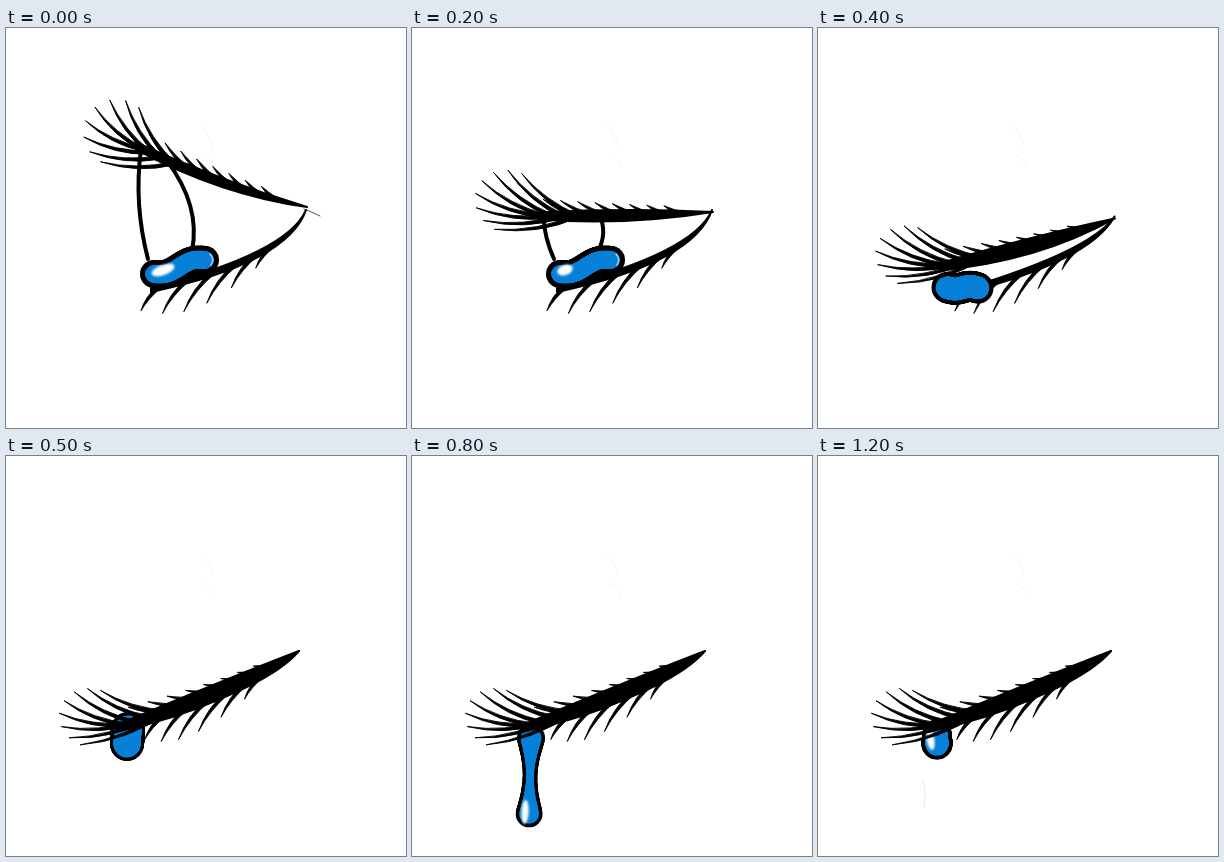
Write an HTML page with a canvas that moves like this. It is 400 px wide and 400 px high and loops after 1.4 s.

```html
<!DOCTYPE html>
<html lang="en">
<head>
<meta charset="utf-8">
<title>Tear</title>
<style>
html, body { margin: 0; width: 100%; height: 100%; overflow: hidden; background: #fff; }
canvas { display: block; width: 400px; height: 400px; }
</style>
</head>
<body>
<canvas id="stage" width="400" height="400"></canvas>
<script>
const ctx = document.getElementById('stage').getContext('2d');
const BLUE = '#0880d8', RAD = Math.PI / 180;
const SPLIT = 10, CLOSED = 5;
const { sin, cos, PI, min, max } = Math;

// Upper lid by step: corner, control, outer end, swell, lash fan from and to (degrees), lash length.
const lidPoses = [
  [0, [301, 179, 215, 160, 130, 118, 7, -24, 94, 57]],
  [2, [301, 184, 215, 189, 126, 188, 9, -17, 69, 67]],
  [3, [301, 186, 215, 204, 130, 206, 12, -19, 58, 71]],
  [CLOSED, [293, 195, 225, 236, 112, 272, 15, -24, 65, 61]]
];
const lowerOpen = [300, 182, 282, 230, 145, 262];
const lowerShut = [293, 195, 262, 226, 150, 263];

const lerp = (a, b, p) => a + (b - a) * p;
const blend = (a, b, p) => a.map((v, i) => lerp(v, b[i], p));

function lidAt(step) {
  const i = lidPoses.findIndex(([key]) => key >= step);
  if (i < 0) return lidPoses[lidPoses.length - 1][1];
  if (i === 0) return lidPoses[0][1];
  const [a, from] = lidPoses[i - 1], [b, to] = lidPoses[i];
  return blend(from, to, (step - a) / (b - a));
}

function along([x0, y0, x1, y1, x2, y2], t) {
  const mix = (a, b, c) => lerp(lerp(a, b, t), lerp(b, c, t), t);
  return [mix(x0, x1, x2), mix(y0, y1, y2)];
}

function curve([x0, y0, x1, y1, x2, y2], width, color = '#000') {
  ctx.beginPath();
  ctx.moveTo(x0, y0);
  ctx.quadraticCurveTo(x1, y1, x2, y2);
  ctx.lineWidth = width;
  ctx.strokeStyle = color;
  ctx.stroke();
}

function ink(width) {
  ctx.fillStyle = ctx.strokeStyle = '#000';
  ctx.lineWidth = width;
  ctx.fill();
  ctx.stroke();
}

// Band that is thin at the inner corner and swells toward the middle.
function band([x0, y0, x1, y1, x2, y2], swell, end) {
  ctx.beginPath();
  ctx.moveTo(x0, y0);
  ctx.quadraticCurveTo(x1, y1 - swell, x2, y2 - end);
  ctx.lineTo(x2, y2 + end);
  ctx.quadraticCurveTo(x1, y1 + swell, x0, y0);
  ink(2);
}

function lash([x, y], [tx, ty], bend, width) {
  const dx = tx - x, dy = ty - y, len = Math.hypot(dx, dy);
  const cx = x + dx / 2 + dy * bend, cy = y + dy / 2 - dx * bend;
  const nx = -dy / len * width / 2, ny = dx / len * width / 2;
  ctx.beginPath();
  ctx.moveTo(x + nx, y + ny);
  ctx.quadraticCurveTo(cx + nx, cy + ny, tx, ty);
  ctx.quadraticCurveTo(cx - nx, cy - ny, x - nx, y - ny);
  ctx.closePath();
  ink(.9);
}

function drawUpper(step) {
  const lid = lidAt(step), [swell, from, to, reach] = lid.slice(6);
  const [endX, endY] = along(lid, 1);
  band(lid, swell, 3.5);

  // Fan at the outer end
  for (let i = 0; i < 8; i++) {
    const u = i / 7, angle = lerp(from, to, u) * RAD;
    const len = reach * (.68 + .32 * sin(PI * u));
    lash(along(lid, .78 + .18 * sin(PI * u)),
      [endX - len * cos(angle), endY - len * sin(angle)], .13, 3.6);
  }

  // Short lashes lying along the lid
  for (let t = .18; t < .85; t += .085) {
    const [x, y] = along(lid, t), [px, py] = along(lid, t + .05);
    const angle = Math.atan2(py - y, px - x) + 26 * RAD;
    const len = 14 + 32 * t;
    lash([x, y], [x + len * cos(angle), y + len * sin(angle)], .08, 3.6);
  }
}

function drawLower(step) {
  const lid = blend(lowerOpen, lowerShut, max(0, min(1, (step - 3) / 2)));
  band(lid, 5, 2);
  for (let i = 0; i < 6; i++) {
    const root = along(lid, .4 + .115 * i), len = 28 + 22 * sin(PI * i / 5);
    lash(root, [root[0] - .6 * len, root[1] + .8 * len], -.12, 3.6);
  }
}

// Both edges of the iris hang from the lid and flatten with it.
function drawIris(step) {
  const lid = lidAt(step);
  const edge = (t, x, y, bulge) => {
    const [topX, topY] = along(lid, t), h = y - topY;
    curve([topX, topY, (topX + x) / 2 + bulge * h, (topY + y) / 2, x, y], 4);
  };
  edge(.97, 142, 231, -.1);
  edge(lerp(.82, .65, min(1, step / 2)), 186, 223, .24);
}

// Tear body: start x,y, end x,y, wave, start radius, end radius, waist, outline
function tearAt(step) {
  if (step < 4) return [148 - 12 * max(0, step - 2), 246, 199, 232, 3, 14, 14, 0, 5];
  if (step < CLOSED) return blend(tearAt(3), tearAt(CLOSED), .5);
  if (step < SPLIT) {
    const k = step - CLOSED;
    return [122 - k, 273 + 3 * k, 121 - 1.3 * k, 288 + 23.3 * k, 0,
      17 - k, 17 - 1.2 * k, .7 * k * k, 3.5];
  }
  const p = (step - SPLIT) / 2;
  return [119, lerp(284, 278, p), 119, lerp(314, 288, p), 0, 14.5, lerp(7, 15.5, p), 0, 4];
}

// A row of circles along the body gives its silhouette.
function blob([x0, y0, x1, y1, wave, r0, r1, waist], inset, color) {
  ctx.fillStyle = color;
  for (let s = 0; s <= 1; s += 1 / 64) {
    const r = lerp(r0, r1, s) - waist * sin(PI * s) - inset;
    ctx.beginPath();
    ctx.arc(lerp(x0, x1, s), lerp(y0, y1, s) + wave * sin(2 * PI * s), max(0, r), 0, 2 * PI);
    ctx.fill();
  }
}

function shine(x, y, rx, ry, turn = 0) {
  ctx.filter = 'blur(1px)';
  ctx.beginPath();
  ctx.ellipse(x, y, rx, ry, turn, 0, 2 * PI);
  ctx.fillStyle = '#fff';
  ctx.fill();
  ctx.filter = 'none';
}

function drawTear(step) {
  const tear = tearAt(step), [x0, y0, x1, y1] = tear;
  blob(tear, 0, '#000');
  blob(tear, tear[8], BLUE);
  if (step < 4) {
    shine(x0 + 9 - 2 * step, y0 - 4, 12 - 2 * step, 5, -.35);
    curve([204, 226, 209, 231, 205, 237], 1.6, '#9ccdf0');
  } else if (step >= SPLIT) {
    shine(112.5, (y0 + y1) / 2, 3.8, 11, -.15);
  } else if (step > CLOSED) {
    shine(x1 - 4, y1 - 2, 3.5, 4 * (step - CLOSED), .05);
  }
}

function drawFalling(step) {
  const y = 23 * (step - SPLIT);
  const drop = [118, 366 + y, 116.5, 383 + y, 0, 5.5, 13, 0];
  const bead = [119, 342 + y, 119, 342 + y, 0, 4.5, 4.5, 0];
  blob(drop, 0, '#000');
  blob(drop, 3.2, BLUE);
  shine(111.5, 382 + y, 3.5, 8, .15);
  blob(bead, 0, '#123');
  blob(bead, 2, '#4b9bd6');
}

function draw(step) {
  ctx.fillStyle = '#fff';
  ctx.fillRect(0, 0, 400, 400);
  ctx.lineCap = ctx.lineJoin = 'round';

  // Faint stray marks
  curve([194, 97, 204, 106, 206, 119], .8, '#f1f1f1');
  curve([198, 127, 205, 130, 209, 139], .8, '#f1f1f1');
  if (step === 0) curve([298, 181, 306, 184, 314, 188], 1, '#555');
  if (step >= SPLIT) curve([104, 323, 109, 335, 106, 352], .8, '#e4e4e4');

  drawLower(step);
  if (step < 4) drawIris(step);
  drawTear(step);
  if (step === SPLIT || step === SPLIT + 1) drawFalling(step);
  drawUpper(step);
}

let shown = -1;
function tick() {
  const step = min(12, Math.floor(performance.now() % 1400 / 100));
  if (step !== shown) draw(shown = step);
  requestAnimationFrame(tick);
}
tick();
</script>
</body>
</html>
```
